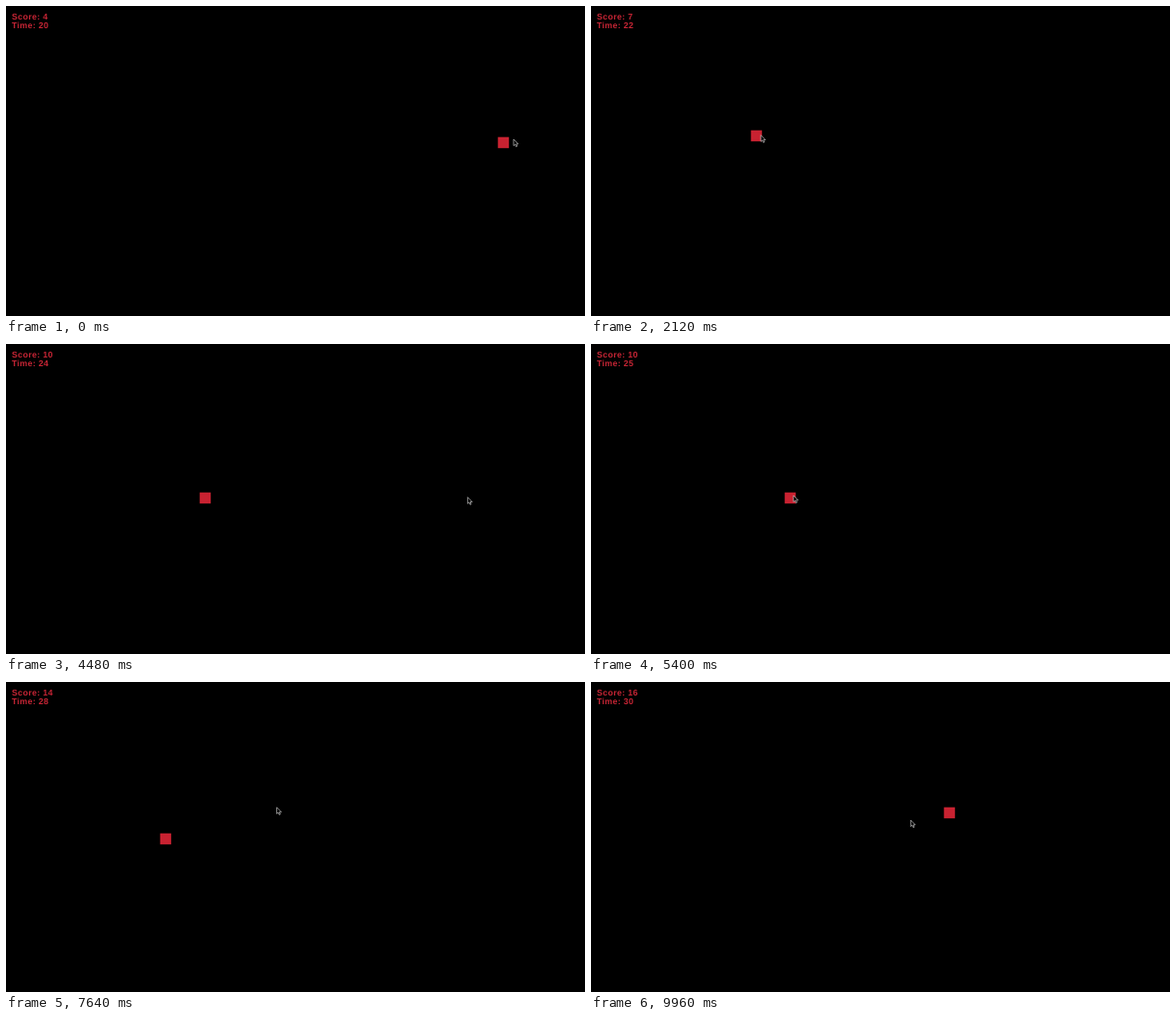
An HTML page that plays this animation: 600x321 px, repeating every 10000 ms.

```html
<!DOCTYPE html>
<html lang="en">
<head>
<meta charset="utf-8">
<title>Catch the square</title>
<style>
  html, body { margin: 0; width: 100%; height: 100%; overflow: hidden; background: #000; }
  svg { display: block; width: 600px; height: 321px; }
  text {
    font: bold 8.8px "Liberation Sans", Arial, sans-serif;
    letter-spacing: .35px;
    text-rendering: geometricPrecision;
    fill: #c82535;
  }
</style>
</head>
<body>
<svg viewBox="0 0 600 321">
  <rect id="square" width="11.5" height="11.5" fill="#c82231"/>
  <text id="score" x="6" y="13.7"></text>
  <text id="time" x="6" y="23"></text>
  <path id="cursor" d="M0 0V6.6L1.6 5.3 2.6 7.7 3.7 7.2 2.7 4.9H4.8Z" fill="#000" stroke="#c4c4c4" stroke-width=".7"/>
</svg>
<script>
const LOOP = 10000, STEP = 40, FIRST_SCORE = 4, FIRST_TIME = 20.42;
const START = { x: 526, y: 138, time: 0 };

// Each square stays at x, y until the pointer catches it at the given ms
const squares = [
  [510, 136, 120], [546, 144, 600], [394, 140, 1440], [166, 129, 2160],
  [550, 146, 3440], [577, 133, 3960], [201, 154, 5440], [95, 124, 6680],
  [264, 148, 7240], [280, 126, 7440], [160, 157, 8760], [305, 142, 9480],
  [366, 130, 10800]
].map(([x, y, time]) => ({ x, y, time }));

const el = id => document.getElementById(id);
const square = el("square"), score = el("score"), time = el("time"), cursor = el("cursor");

const aim = ({ x, y, time }) => ({ x: x + 8, y: y + 2, time });
const mix = (a, b, u) => a + (b - a) * u;

// Eases sideways, corrects height late, and sags more on long trips
function pointer(t, caught) {
  const from = caught ? aim(squares[caught - 1]) : START;
  const to = aim(squares[caught]);
  const u = (t - from.time) / (to.time - from.time);
  const sag = (to.x - from.x) ** 2 / 6000 * Math.sin(Math.PI * u);
  return [mix(from.x, to.x, u * u * (3 - 2 * u)), mix(from.y, to.y, u * u) + sag];
}

function draw(now) {
  const t = Math.floor(now % LOOP / STEP) * STEP;
  const caught = squares.findIndex(s => t < s.time);
  square.setAttribute("x", squares[caught].x - .3);
  square.setAttribute("y", squares[caught].y - .3);
  score.textContent = "Score: " + (FIRST_SCORE + caught);
  time.textContent = "Time: " + Math.floor(FIRST_TIME + t / 1000);
  cursor.setAttribute("transform", `translate(${pointer(t, caught)})`);
}

const start = performance.now();
function tick() {
  draw(performance.now() - start);
  requestAnimationFrame(tick);
}
tick();
</script>
</body>
</html>
```
